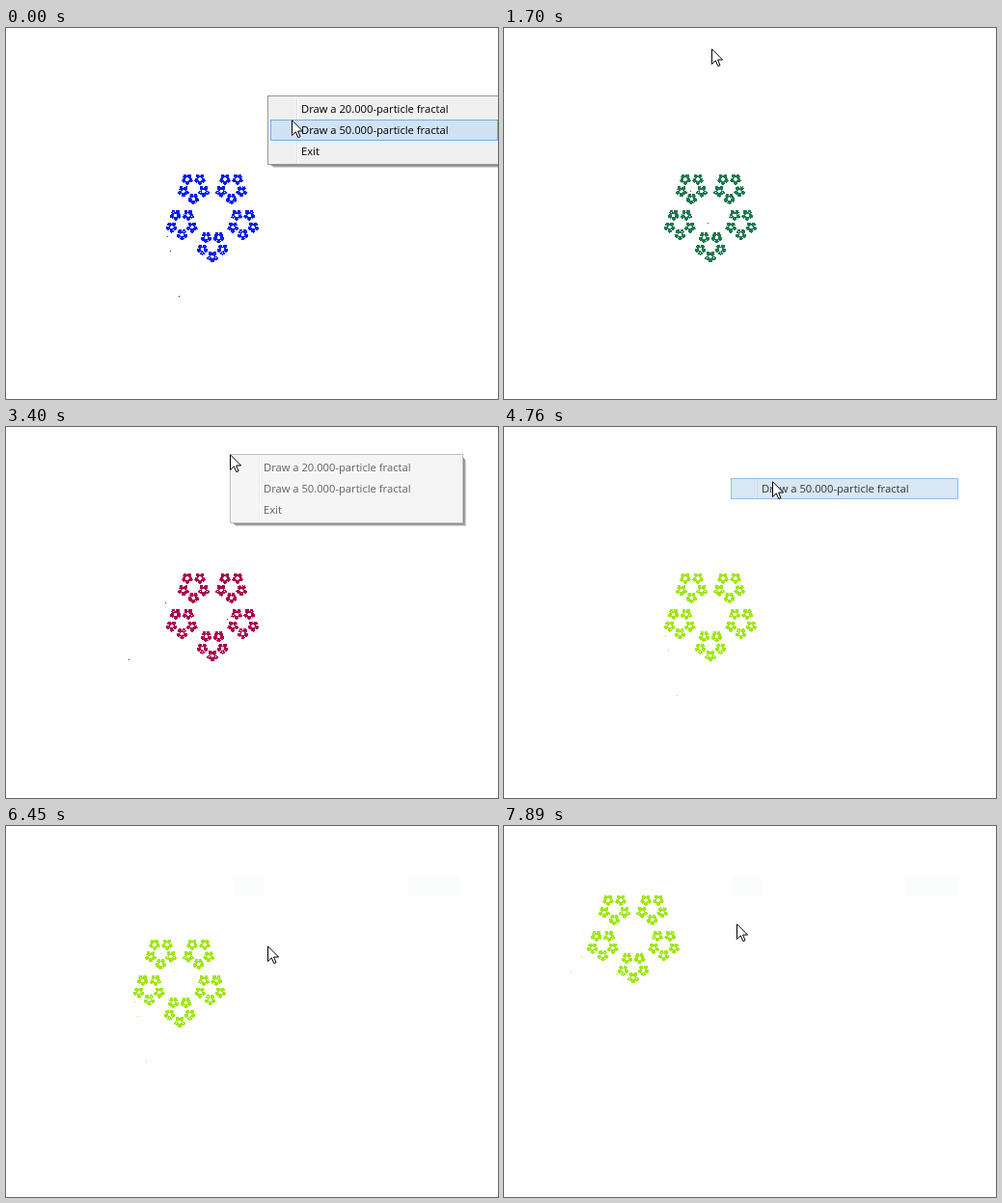
These frames come from a looping animation (510x385 px, 8 s). An HTML page with a canvas:

```html
<!DOCTYPE html>
<html lang="en">
<head>
<meta charset="utf-8">
<title>Particle fractal</title>
<style>
  html, body { margin: 0; width: 100%; height: 100%; overflow: hidden; background: #fefefe; }
  #stage { position: relative; width: 510px; height: 385px; overflow: hidden; }
  #stage > * { position: absolute; }
  canvas { left: 0; top: 0; }
  /* Only the strip right of and below the menu is left visible */
  #shadow {
    width: 239px; height: 69px; background: rgba(0, 0, 0, .45);
    box-shadow: 1px 1px rgba(0, 0, 0, .22), 2px 2px rgba(0, 0, 0, .16);
    clip-path: polygon(238px 0, 241px 0, 241px 71px, 0 71px, 0 68px, 238px 68px);
  }
  #menu {
    box-sizing: border-box; width: 242px; height: 72px; padding: 2px;
    border: 1px solid #979797; background: #f0f0f0;
    font: 11.2px/22px "Open Sans", "Noto Sans", sans-serif; color: #000;
  }
  #menu.bare { border-color: transparent; background: none; }
  .item { position: relative; height: 22px; padding-left: 32px; white-space: nowrap; }
  .item::before {
    content: ""; position: absolute; left: 27px; top: 0; width: 1px; height: 22px;
    background: rgba(0, 0, 0, .06); box-shadow: 1px 0 #fff;
  }
  .item.on { background: #d1e2f2; box-shadow: inset 0 0 0 1px #78aee5; }
  .item.on::before { box-shadow: none; top: 1px; height: 20px; }
  .bare .item:not(.on) { visibility: hidden; }
  #ghost { left: 236px; top: 53px; width: 235px; height: 21px;
    background: linear-gradient(90deg, #fbfdfd 32px, transparent 32px 180px, #fbfdfd 180px); }
  #cursor { left: 0; top: 0; }
</style>
</head>
<body>
<div id="stage">
  <canvas id="field" width="510" height="385"></canvas>
  <div id="ghost"></div>
  <div id="shadow"></div>
  <div id="menu">
    <div class="item">Draw a 20.000-particle fractal</div>
    <div class="item">Draw a 50.000-particle fractal</div>
    <div class="item">Exit</div>
  </div>
  <svg id="cursor" width="13" height="20">
    <path d="M.5 .8V16.5L4.3 12.8 6.8 18.6 9 17.7 6.6 12H11.6Z" fill="#fff" stroke="#000"/>
  </svg>
</div>
<script>
const LOOP = 8000, STEP = 120;
const $ = id => document.getElementById(id);
const ctx = $('field').getContext('2d');
const items = [...document.querySelectorAll('.item')];

// Corners: 0 bottom, 1 right, 2 top right, 3 top left, 4 left
const corners = [0, 1, 2, 3, 4].map(k => {
  const a = k * Math.PI * 2 / 5;
  return [214 + 50 * Math.sin(a), 193 + 50 * Math.cos(a)];
});
const jump = (p, k) => p.map((v, i) => (v + 2 * corners[k][i]) / 3);

// Chaos game, kept as unique pixels
function playChaos(count) {
  const cells = new Map();
  let seed = 7, p = corners[0];
  for (let i = 0; i < count; i++) {
    seed = (seed * 1664525 + 1013904223) >>> 0;
    p = jump(p, Math.floor(seed / 4294967296 * 5));
    const c = p.map(Math.floor);
    cells.set(c[1] * 510 + c[0], c);
  }
  return [...cells.values()];
}
const cells = playChaos(30000);

const LIME = '#a0e614';
const runs = [
  { at: 0, color: '#001ee6', start: [179, 278], picks: [4, 4] },
  { at: 620, color: '#1e7850', start: [147, 301], picks: [2, 3], startAt: 2300 },
  { at: 2800, color: '#aa0050', start: [127, 241], picks: [3, 1] },
  { at: 4760, color: LIME, start: [179, 278], picks: [4, 4] },
  { at: 6680, color: LIME, start: [142, 294], picks: [4, 0] },
  { at: 7280, color: LIME, start: [126, 230], picks: [4, 3] },
  { at: 7760, color: LIME, start: [149, 231], picks: [4, 0] }
];

const menus = [
  { x: 271, y: 70, open: -1000, pick: 620, sel: () => 1 },
  { x: 215, y: 21, open: 1820, pick: 2800, sel: t => t < 2180 ? -1 : 0 },
  { x: 232, y: 28, open: 3280, pick: 4760, sel: t => t < 3520 ? -1 : t < 3640 ? 0 : 1, end: 5000 }
];

const path = [
  [0, 296, 95], [119, 296, 95], [120, 297, 97], [860, 297, 97], [1340, 255, 48],
  [1700, 215, 21], [2060, 215, 21], [2180, 252, 35], [2920, 252, 35], [3160, 232, 28],
  [3400, 232, 28], [3520, 255, 38], [3640, 278, 56], [5120, 278, 56], [5600, 300, 118],
  [5970, 283, 134], [6450, 271, 124], [6810, 262, 117], [7650, 246, 105], [7890, 241, 101]
];
const drift = [[5480, 0], [5970, -13], [6450, -34], [6810, -44], [7650, -70], [7890, -80]];

function sample(keys, t) {
  const i = keys.findIndex(k => k[0] > t);
  if (i < 0) return keys[keys.length - 1].slice(1);
  if (i === 0) return keys[0].slice(1);
  const a = keys[i - 1], b = keys[i], f = (t - a[0]) / (b[0] - a[0]);
  return a.slice(1).map((v, j) => Math.round(v + (b[j + 1] - v) * f));
}

function snap(t) {
  const base = [5970, 4760, 2800, 620, 0].find(b => t >= b);
  return base + Math.floor((t - base) / STEP) * STEP;
}

function drawField(t) {
  const run = runs.filter(r => r.at <= t).pop();
  const [off] = sample(drift, t);
  const dot = p => ctx.fillRect(Math.floor(p[0]) + off, Math.floor(p[1]) + off, 1, 1);
  ctx.clearRect(0, 0, 510, 385);
  ctx.fillStyle = run.color;
  let p = run.start;
  if (t >= (run.startAt || 0)) dot(p);
  for (const k of run.picks) dot(p = jump(p, k));
  cells.forEach(dot);
}

function drawMenu(t) {
  const m = menus.filter(m => m.open <= t).pop();
  const picked = t >= m.pick;
  const fade = Math.max(0, .8 - .34 * Math.floor((t - m.pick) / STEP));
  const alpha = !picked ? Math.min(1, .25 + .36 * Math.floor((t - m.open) / STEP))
    : t >= m.end ? 0 : fade;
  const sel = m.sel(t);
  $('menu').className = picked ? 'bare' : '';
  $('menu').style.cssText = `left:${m.x}px;top:${m.y}px;opacity:${alpha}`;
  $('shadow').style.cssText = `left:${m.x + 4}px;top:${m.y + 4}px;opacity:${picked ? 0 : 1}`;
  items.forEach((el, i) => el.classList.toggle('on', i === sel));
  $('ghost').style.opacity = t >= 5000 ? 1 : 0;
}

let last = -1;
function tick(now) {
  const t = snap(now % LOOP);
  if (t !== last) {
    last = t;
    drawField(t);
    drawMenu(t);
    const [x, y] = sample(path, t);
    $('cursor').style.transform = `translate(${x}px, ${y}px)`;
  }
  requestAnimationFrame(tick);
}
tick(0);
</script>
</body>
</html>
```
